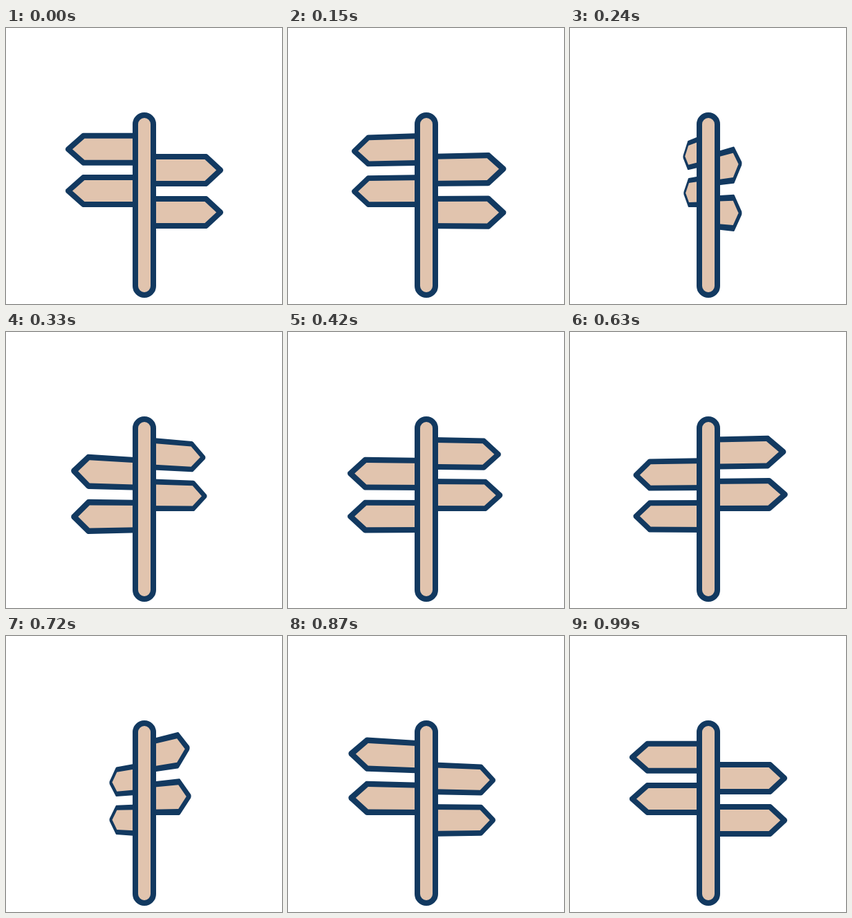
Recreate the animation shown at these times as an HTML page. Size 399 px wide and 399 px high, loop 1020 ms.

```html
<!DOCTYPE html>
<html lang="en">
<head>
<meta charset="utf-8">
<title>Turning signpost</title>
<style>
  html, body { margin: 0; width: 100%; height: 100%; overflow: hidden; background: #fff; }
  svg { display: block; width: 100%; height: 100%; }
  .edge { fill: #123960; }
  .face { fill: #e1c4ae; }
  .post { fill: #e1c4ae; stroke: #123960; stroke-width: 8; }
</style>
</head>
<body>
<svg viewBox="0 0 399 399">
  <g id="signs"></g>
  <rect class="post" x="187" y="126" width="26" height="260" rx="13"/>
</svg>
<script>
const LOOP = 1020, TICK = 30;
const DEPTH = 700, EYE_Y = 260;
const HALF = 19.5, LINE = 4;

// Each sign turns about its own vertical axis.
const signs = [
  { side: -1, axis: 198.4, y: 175.3, tip: 90, corner: 112 },
  { side: -1, axis: 199.6, y: 235.5, tip: 90, corner: 112 },
  { side: 1, axis: 200.75, y: 205.5, tip: 310, corner: 289 },
  { side: 1, axis: 200.75, y: 266.5, tip: 310, corner: 289 }
];

const turns = [
  { start: 30, end: 540, x1: 0.65, x2: 0.2 },
  { start: 570, end: 990, x1: 0.39, x2: 0.48 }
];

// Bezier easing with flat ends: (x1, 0, x2, 1).
function ease(x, x1, x2) {
  if (x <= 0) return 0;
  if (x >= 1) return 1;
  let lo = 0, hi = 1;
  for (let i = 0; i < 30; i++) {
    const s = (lo + hi) / 2, r = 1 - s;
    const at = 3 * s * r * r * x1 + 3 * s * s * r * x2 + s * s * s;
    if (at < x) lo = s; else hi = s;
  }
  return lo * lo * (3 - 2 * lo);
}

function arc(cx, cy, from, to) {
  const pts = [];
  for (let i = 0; i <= 6; i++) {
    const a = from + (to - from) * i / 6;
    pts.push([cx + LINE * Math.cos(a), cy + LINE * Math.sin(a)]);
  }
  return pts;
}

// Flat outlines, measured outwards from the axis.
function shape(sign) {
  const tip = Math.abs(sign.tip - sign.axis);
  const corner = Math.abs(sign.corner - sign.axis);
  const right = Math.PI / 2;
  const slope = Math.atan2(tip - corner, HALF);
  const h = HALF + LINE, inner = HALF - LINE;
  const bend = corner - LINE * Math.tan((right - slope) / 2);
  return {
    edge: [
      [0, -h],
      ...arc(corner, -HALF, -right, -slope),
      ...arc(tip, 0, -slope, slope),
      ...arc(corner, HALF, slope, right),
      [0, h]
    ],
    face: [
      [0, -inner], [bend, -inner],
      [tip - LINE / Math.cos(slope), 0],
      [bend, inner], [0, inner]
    ]
  };
}

function project(sign, pts, angle) {
  const cos = Math.cos(angle), sin = Math.sin(angle);
  return "M" + pts.map(([r, dy]) => {
    const u = sign.side * r;
    const scale = DEPTH / (DEPTH - u * sin);
    const x = sign.axis + u * cos * scale;
    const y = EYE_Y + (sign.y + dy - EYE_Y) * scale;
    return x.toFixed(2) + " " + y.toFixed(2);
  }).join("L") + "Z";
}

const group = document.getElementById("signs");

function addPath(name) {
  const path = document.createElementNS("http://www.w3.org/2000/svg", "path");
  path.setAttribute("class", name);
  return group.appendChild(path);
}

const parts = signs.flatMap(sign => {
  const outline = shape(sign);
  return ["edge", "face"].map(name => ({ sign, pts: outline[name], path: addPath(name) }));
});

function draw(now) {
  const t = Math.floor((now % LOOP) / TICK) * TICK;
  const angle = Math.PI * turns.reduce((sum, k) =>
    sum + ease((t - k.start) / (k.end - k.start), k.x1, k.x2), 0);
  for (const p of parts) p.path.setAttribute("d", project(p.sign, p.pts, angle));
}

const begin = performance.now();

function loop() {
  draw(performance.now() - begin);
  requestAnimationFrame(loop);
}

loop();
</script>
</body>
</html>
```
